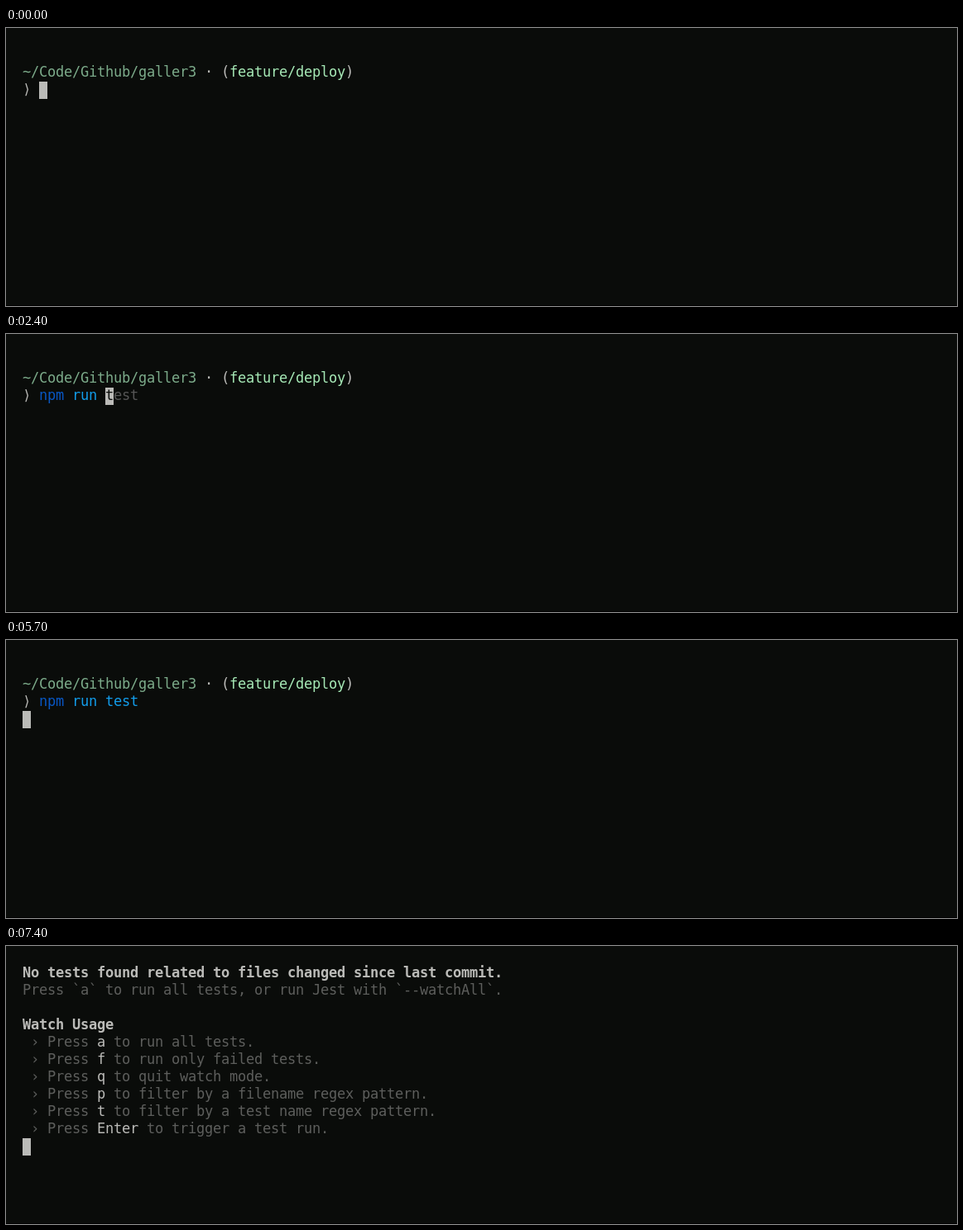
Write an HTML page that moves like this. It is 1149 px wide and 337 px high and loops after 8000 ms.

```html
<!DOCTYPE html>
<html lang="en">
<head>
<meta charset="utf-8">
<title>Terminal session</title>
<style>
  html, body { margin: 0; width: 100%; height: 100%; overflow: hidden; background: #0a0c0a; }
  #screen {
    position: absolute; inset: 0; overflow: hidden;
    border-bottom: 1px solid #000;
    font: 17px/20px "DejaVu Sans Mono", monospace;
    letter-spacing: calc(10px - 1ch); /* whole-pixel terminal columns */
    color: #bbbbb8;
  }
  #screen span, #screen i { position: absolute; white-space: pre; }
  #screen i { width: 10px; height: 21px; background: #bbbbb8; }
  .path { color: #7cab8a; }
  .branch { color: #a6e9b6; }
  .command { color: #0857c3; }
  .param { color: #129cea; }
  .error { color: #f00; }
  .hint { color: #555; }
  .under { color: #0a0c0a; }
  .dim { color: #5d5e5c; }
  .bold { font-weight: bold; }
</style>
</head>
<body>
<div id="screen"></div>
<script>
const LOOP = 8000;
const COMMAND = "npm run test";
const screen = document.getElementById("screen");

function place(tag, left, top) {
  const el = document.createElement(tag);
  el.style.left = left + "px";
  el.style.top = top + "px";
  return screen.appendChild(el);
}

function put(row, col, text, style = "") {
  const el = place("span", 20 + 10 * col, 22 + 21 * row);
  el.className = style;
  el.textContent = text;
}

function cursor(row, col) {
  place("i", 20 + 10 * col, 23 + 21 * row);
}

function prompt(typed) {
  put(1, 0, "~/Code/Github/galler3", "path");
  put(1, 22, "·");
  put(1, 24, "(");
  put(1, 25, "feature/deploy", "branch");
  put(1, 39, ")");
  put(2, 0, "⟩");
  put(2, 2, COMMAND.slice(0, Math.min(typed, 3)), typed < 3 ? "error" : "command");
  put(2, 6, COMMAND.slice(4, Math.max(typed, 4)), "param");
}

function typing(typed) {
  prompt(typed);
  cursor(2, 2 + typed);
  if (typed > 0) {
    put(2, 2 + typed, COMMAND.slice(typed, typed + 1), "under");
    put(2, 3 + typed, COMMAND.slice(typed + 1), "hint");
  }
}

function submitted() {
  prompt(COMMAND.length);
  cursor(3, 0);
}

function started() {
  prompt(COMMAND.length);
  put(4, 0, "> galler3@0.1.0 test /home/pix3n/Code/Github/galler3");
  put(5, 0, "> react-scripts test");
  cursor(7, 0);
}

function determining() {
  put(0, 0, "Determining test suites to run...", "dim bold");
  cursor(0, 33);
}

function usage() {
  put(0, 0, "No tests found related to files changed since last commit.", "bold");
  put(1, 0, "Press `a` to run all tests, or run Jest with `--watchAll`.", "dim");
  put(3, 0, "Watch Usage", "bold");
  [
    ["a", "run all tests."],
    ["f", "run only failed tests."],
    ["q", "quit watch mode."],
    ["p", "filter by a filename regex pattern."],
    ["t", "filter by a test name regex pattern."],
    ["Enter", "trigger a test run."]
  ].forEach(([key, action], i) => {
    put(4 + i, 1, "›", "dim");
    put(4 + i, 3, "Press", "dim");
    put(4 + i, 9, key);
    put(4 + i, 10 + key.length, "to " + action, "dim");
  });
  cursor(10, 0);
}

// [start in ms, scene, characters typed]
const timeline = [
  [0, typing, 0],
  [1100, typing, 1],
  [1400, typing, 2],
  [1700, typing, 3],
  [1900, typing, 4],
  [2100, typing, 5],
  [2200, typing, 6],
  [2400, typing, 8],
  [2800, typing, 9],
  [2900, typing, 10],
  [3100, typing, 11],
  [3300, typing, 12],
  [5700, submitted],
  [6200, started],
  [7300, determining],
  [7400, usage]
];

let shown;
function render() {
  const time = performance.now() % LOOP;
  const step = timeline.filter(([start]) => start <= time).pop();
  if (step !== shown) {
    shown = step;
    screen.replaceChildren();
    const [, scene, typed] = step;
    scene(typed);
  }
  requestAnimationFrame(render);
}
render();
</script>
</body>
</html>
```
